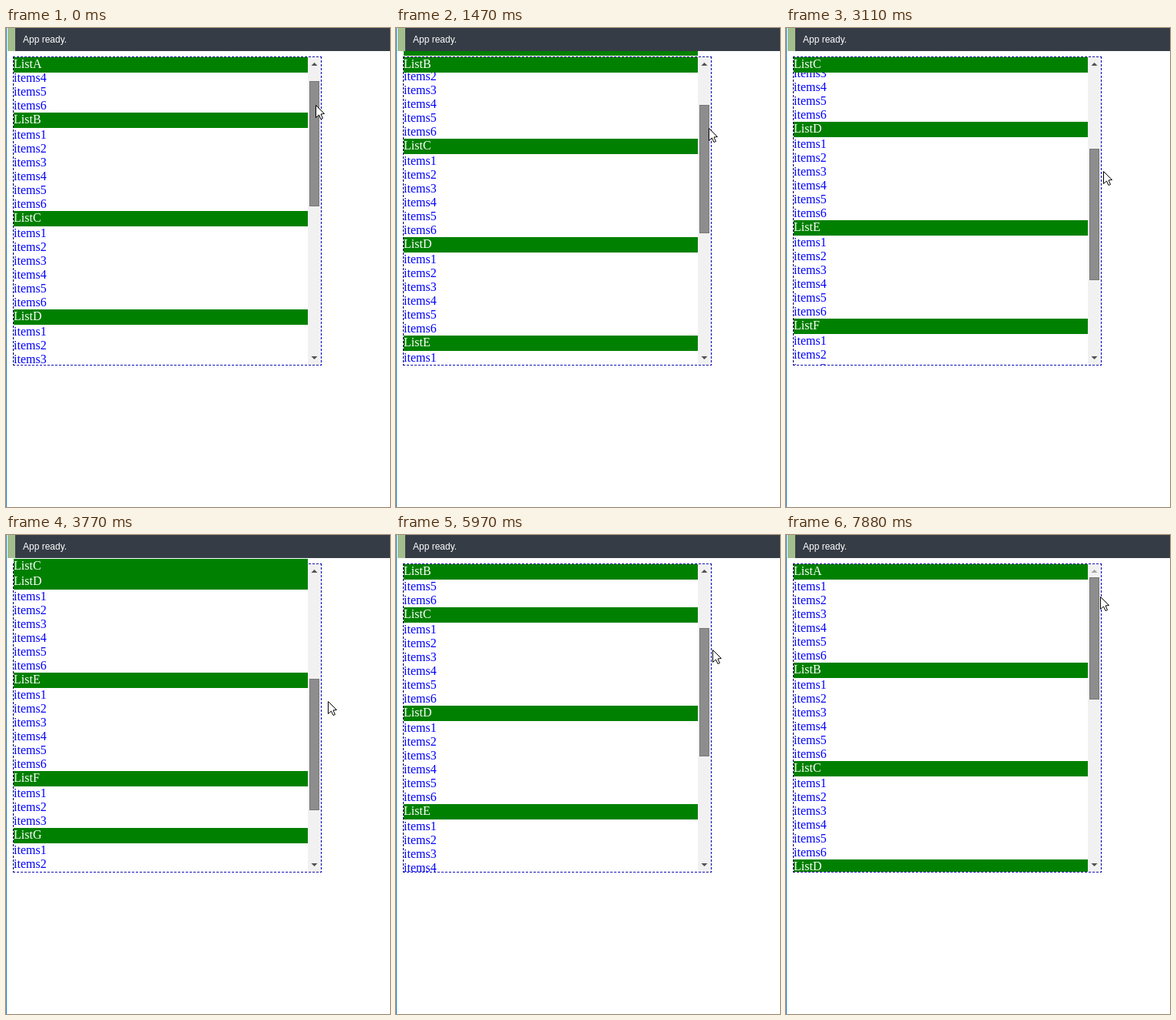
Animation of 500x623 px, one loop 8 s. Source, as an HTML page with a canvas:

```html
<!DOCTYPE html>
<html lang="en">
<head>
<meta charset="utf-8">
<title>Sticky list headers</title>
<style>
  html, body { margin: 0; width: 100%; height: 100%; overflow: hidden; background: #fff; }
  canvas { display: block; }
</style>
</head>
<body>
<canvas id="stage" width="500" height="623"></canvas>
<script>
const ctx = document.getElementById('stage').getContext('2d');
const LOOP = 8000, STEP = 137;
const BOX = { x: 10, y: 38, size: 400, listW: 383 };
const HEAD = 20, ROW = 18, CONTENT = 918, TRACK = 366, TOOLBAR = 30;
const lists = [6, 6, 6, 6, 6, 3, 6].map((count, i) => ({ name: 'List' + 'ABCDEFG'[i], count }));

// time, scroll offset, pointer x, pointer y
const keys = [
  [0, 36, 403, 100], [150, 40, 403, 102], [1080, 90, 407, 121], [1200, 96, 407, 124],
  [1470, 110, 407, 130], [2200, 169, 409, 156], [2320, 178, 409, 160], [2480, 191, 410, 165],
  [3260, 264, 415, 196], [3380, 275, 416, 201], [3770, 311, 419, 216], [4220, 332, 420, 225],
  [4490, 332, 420, 225], [4500, 322, 420, 218], [4800, 292, 416, 205], [5460, 218, 414, 174],
  [5580, 204, 413, 168], [5970, 160, 412, 149], [6480, 117, 411, 128], [6630, 104, 410, 123],
  [7610, 16, 409, 87], [7760, 5, 409, 82], [7880, 0, 409, 80], [LOOP, 0, 409, 80]
];

function poseAt(t) {
  const i = keys.findIndex(k => k[0] > t) - 1;
  const a = keys[i], b = keys[i + 1];
  const held = a[1] === b[1];
  const steps = held ? 1 : Math.max(1, Math.round((b[0] - a[0]) / STEP));
  const f = Math.floor((t - a[0]) / (b[0] - a[0]) * steps) / steps;
  return [1, 2, 3].map(j => Math.round(a[j] + (b[j] - a[j]) * f));
}

function rect(color, x, y, w, h) {
  ctx.fillStyle = color;
  ctx.fillRect(x, y, w, h);
}

function text(str, color, x, y, font = '16px "Liberation Serif", "Times New Roman", serif') {
  ctx.font = font;
  ctx.fillStyle = color;
  ctx.fillText(str, x, y);
}

function poly(color, points) {
  ctx.beginPath();
  points.forEach(([x, y]) => ctx.lineTo(x, y));
  ctx.closePath();
  ctx.fillStyle = color;
  ctx.fill();
}

function clipped(x, y, w, h, draw) {
  ctx.save();
  ctx.beginPath();
  ctx.rect(x, y, w, h);
  ctx.clip();
  draw();
  ctx.restore();
}

function dashed(color, x1, y1, x2, y2) {
  ctx.strokeStyle = color;
  ctx.beginPath();
  ctx.moveTo(x1, y1);
  ctx.lineTo(x2, y2);
  ctx.stroke();
}

function drawBorder() {
  const l = BOX.x - 0.5, t = BOX.y - 0.5, r = l + 401, b = t + 401;
  ctx.lineWidth = 1;
  ctx.setLineDash([3, 2]);
  dashed('#0000a8', l - 0.5, t, r + 0.5, t);
  dashed('#0000b8', r, t - 0.5, r, b + 0.5);
  dashed('#0000b8', l - 0.5, b, r + 0.5, b);
  dashed('#000040', l, t - 0.5, l, b + 0.5);
  ctx.setLineDash([]);
}

function drawHeader(name, y) {
  rect('#008000', BOX.x, y, BOX.listW, HEAD);
  text(name, '#fff', BOX.x, y + 14);
}

// Stuck headers leave the flow, so later rows move up by one header each.
function drawLists(scroll) {
  const stuck = [];
  let y = BOX.y - scroll;
  clipped(BOX.x, BOX.y, BOX.listW, BOX.size, () => {
    for (const { name, count } of lists) {
      if (y < BOX.y && stuck.every(h => h.end !== null)) {
        stuck.push({ name, end: y + count * ROW });
      } else {
        drawHeader(name, y);
        y += HEAD;
      }
      for (let n = 1; n <= count; n++, y += ROW) text('items' + n, '#00f', BOX.x, y + 14);
    }
  });
  clipped(0, TOOLBAR, 500, 593, () => {
    for (const { name, end } of stuck) drawHeader(name, Math.min(BOX.y, end - HEAD));
  });
  return stuck.length;
}

function drawScrollbar(scroll, stuckCount) {
  const x = BOX.x + BOX.listW, mid = x + 8.5;
  const height = CONTENT - stuckCount * HEAD;
  const thumb = Math.round(TRACK * BOX.size / height);
  const top = BOX.y + 17 + Math.floor((TRACK - thumb) * scroll / (height - BOX.size));
  rect('#f1f1f1', x, BOX.y, 17, BOX.size);
  poly(scroll ? '#505050' : '#a3a3a3', [[mid - 4, 49], [mid, 45], [mid + 4, 49]]);
  poly('#505050', [[mid - 4, 427], [mid + 4, 427], [mid, 431]]);
  rect('#787878', x + 2, top, 13, thumb);
  rect('#8d8d8d', x + 3, top + 1, 11, thumb - 2);
}

function drawToolbar() {
  rect('#353c46', 12, 0, 488, TOOLBAR);
  rect('#a3be8c', 2, 0, 10, TOOLBAR);
  rect('#1883d7', 0, 0, 1, 623);
  text('App ready.', '#fff', 22, 19, '12px "Liberation Sans", Arial, sans-serif');
}

function drawPointer(x, y) {
  ctx.save();
  ctx.translate(x + 0.5, y + 0.5);
  poly('#fff', [[0, 0], [0, 16], [4, 12.5], [6.5, 18], [9, 17], [6.5, 11.5], [11, 11]]);
  ctx.strokeStyle = '#000';
  ctx.lineWidth = 1;
  ctx.stroke();
  ctx.restore();
}

function draw(now) {
  const [scroll, px, py] = poseAt(now % LOOP);
  rect('#fff', 0, 0, 500, 623);
  drawBorder();
  drawScrollbar(scroll, drawLists(scroll));
  drawToolbar();
  drawPointer(px, py);
}

let start;
function tick(now) {
  start ??= now;
  draw(Math.max(0, now - start));
  requestAnimationFrame(tick);
}
draw(0);
requestAnimationFrame(tick);
</script>
</body>
</html>
```
